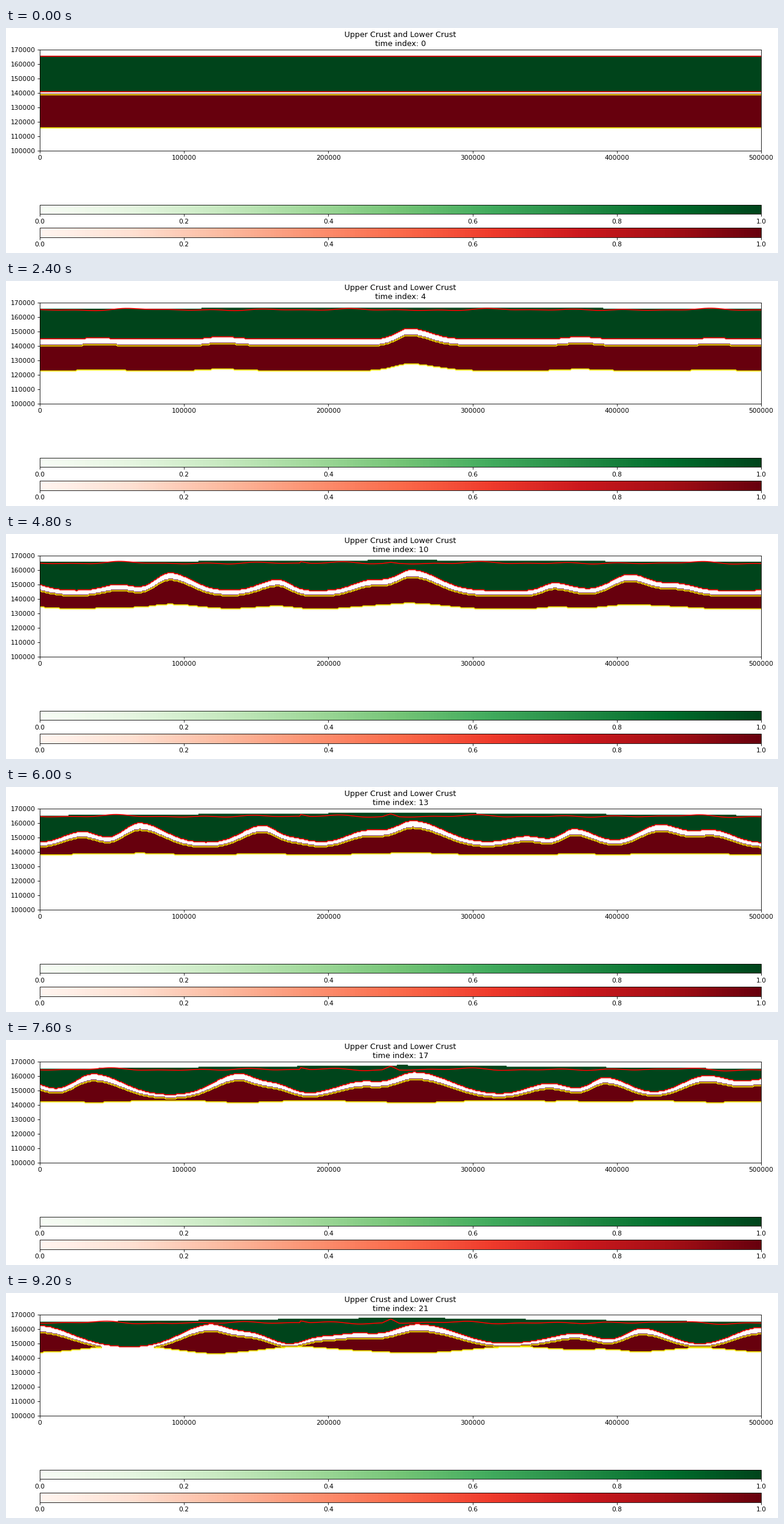
Animation of 1280x374 px, one loop 9600 ms. Source, as a matplotlib script:

```python
import numpy as np
import matplotlib.pyplot as plt
from matplotlib.animation import FuncAnimation
from matplotlib.cm import ScalarMappable

W, H, DPI = 1280, 374, 76.8
LEFT, RIGHT, TOP = 56, 1252, 36.3
M = 500000 / (RIGHT - LEFT)      # metres per pixel, same on both axes
BOTTOM = TOP + 70000 / M
ZERO = 37                        # row of 170000 m in the curves below
CELL = 1.67                      # grid cell in pixels
LAST = 21
STRETCH, CENTER = 0.041, 654     # the layers are pulled apart from the centre

# Folds: final position, height, width on the left, width on the right, birth
FOLDS = [
    (-365, 30, 34, 62, 3.7),
    (-78, 27, 42, 36, 8),
    (54, 37, 38, 56, 3.5),
    (335, 38, 47, 32, 7.3),
    (408, 25, 34, 33, 11.5),
    (510, 13, 22, 24, 16.5),
    (576, 23, 45, 40, 4.5),
    (684, 39, 42, 68, 1.5),
    (865, 9, 35, 35, 17.5),
    (945, 25, 42, 40, 10.5),
    (1055, 33, 29, 45, 8),
    (1252, 34, 48, 50, 3.5),
    (1375, 29, 42, 45, 8),
    (1703, 30, 48, 40, 3.7),
]

x = np.append(np.arange(LEFT, RIGHT, CELL), RIGHT)
rng = np.random.default_rng(4)
WAVES = [(length, rng.uniform(0, 2 * np.pi)) for length in (310, 190, 120, 75)]


def rise(n, birth, tau):
    return 1 - np.exp(-max(n - birth, 0) / tau)


def relief(n, spread=1, youngest=LAST):
    """Sum of all folds, carried outwards by the stretching."""
    at = CENTER + (x - CENTER) * np.exp(STRETCH * (LAST - n))
    total = np.zeros_like(x)
    for pos, height, wl, wr, birth in FOLDS:
        if birth < youngest:
            width = spread * np.where(at < pos, wl, wr)
            total += height * rise(n, birth, 4) * np.exp(-0.5 * ((at - pos) / width) ** 2)
    return total


def surface(n):
    """Wavy line near the top with a kink and a spike that grow with time."""
    y = 48 + 0.1 * n
    for length, phase in WAVES:
        y = y + 0.75 * rise(n, 0, 2) * np.sin(2 * np.pi * x / length + phase + 0.12 * n)
    y = y - 3 * rise(n, 7, 2) * np.clip(1 - (x - 489) / 15, 0, 1) * (x > 488)
    return y - 7 * rise(n, 9, 4) * np.clip(1 - abs(x - 638) / 14, 0, 1)


def snap(y):
    return np.round(y / CELL) * CELL


def shapes(n):
    folds = relief(n)
    up = 107.4 - 9.3 * rise(n, 0, 1.5) - 0.3 * n - folds
    mid = up + 4.5 + 9 * rise(n, 0, 1.5) - 0.42 * n + 0.009 * n * folds
    low = 167 - 4.35 * n + 0.025 * n ** 2 - (0.85 - 0.057 * n) * relief(n, 1.25, 15)
    # terraces: the doming roof cut into whole cells
    steps = 2 + np.ceil(0.01 + (abs(x - 657) - 340) * n / 2800)
    top = 41.8 + 1.65 * steps
    return top, surface(n), snap(up), snap(mid), snap(low)


def to_x(px):
    return (px - LEFT) * M


def to_y(py):
    return 170000 - (py - ZERO) * M


def band(hi, lo):
    """Closed outline of a layer made of square cells."""
    edges = np.concatenate([x[:1], (x[1:] + x[:-1]) / 2, x[-1:]])
    ex = np.repeat(edges, 2)[1:-1]
    hi, lo = np.repeat(hi, 2), np.repeat(lo, 2)
    return np.column_stack([to_x(np.append(ex, ex[::-1])), to_y(np.append(hi, lo[::-1]))])


def box(top, bottom):
    return [LEFT / W, 1 - bottom / H, (RIGHT - LEFT) / W, (bottom - top) / H]


plt.rcParams["font.family"] = "DejaVu Sans"
fig = plt.figure(figsize=((W + 0.01) / DPI, (H + 0.01) / DPI), dpi=DPI, facecolor="white")
ax = fig.add_axes(box(TOP, BOTTOM))
ax.set_xlim(0, 500000)
ax.set_ylim(100000, 170000)
ax.set_xticks(range(0, 500001, 100000))
ax.set_yticks(range(100000, 170001, 10000))
title = ax.set_title("")

for cmap, y0, y1 in (("Greens", 294, 309.3), ("Reds", 332, 348)):
    cax = fig.add_axes(box(y0, y1))
    fig.colorbar(ScalarMappable(cmap=cmap), cax=cax, orientation="horizontal",
                 ticks=np.linspace(0, 1, 6))

green, = ax.fill([0, 1, 1], [0, 0, 1], color="#00441b", lw=0)
dark, = ax.fill([0, 1, 1], [0, 0, 1], color="#67000d", lw=0)
reds = [ax.plot([], [], color="red", lw=1.5)[0] for _ in range(2)]
yellows = [ax.plot([], [], color="yellow", lw=1.5)[0] for _ in range(2)]


def draw(frame):
    n = max(0, frame - 2)        # the first state is held for three beats
    top, line, up, mid, low = shapes(n)
    solid = mid <= low
    green.set_xy(band(top, up))
    dark.set_xy(band(np.where(solid, mid - 2, low), low))
    for artist, y in zip(reds, (line, up)):
        artist.set_data(to_x(x), to_y(y))
    for artist, y in zip(yellows, (mid, low)):
        artist.set_data(to_x(x), to_y(np.where(solid, y, np.nan)))
    title.set_text(f"Upper Crust and Lower Crust\ntime index: {n}")
    return [green, dark, title, *reds, *yellows]


anim = FuncAnimation(fig, draw, frames=24, interval=400, repeat=True, repeat_delay=0, blit=False)
plt.show()
```
